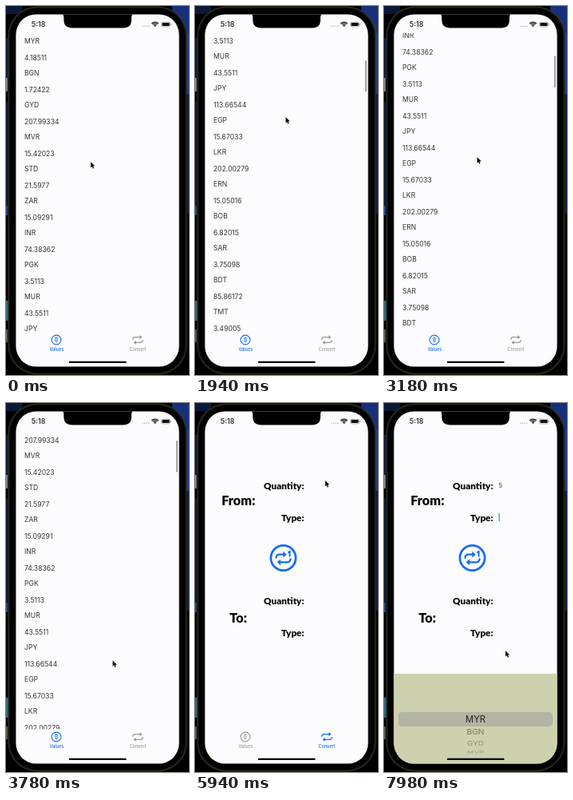
Write an HTML page with a canvas that moves like this. It is 229 px wide and 462 px high and loops after 8 s.

```html
<!DOCTYPE html>
<html lang="en">
<head>
<meta charset="utf-8">
<title>Currency values and converter</title>
<style>
html, body { margin: 0; width: 100%; height: 100%; overflow: hidden; background: #000; }
canvas { display: block; width: 229px; height: 462px; }
</style>
</head>
<body>
<canvas id="stage"></canvas>
<script>
const W = 229, H = 462, LOOP = 8000;
const canvas = document.getElementById('stage');
const dpr = window.devicePixelRatio || 1;
canvas.width = W * dpr;
canvas.height = H * dpr;
const ctx = canvas.getContext('2d');

const BLUE = '#126cf0', GREY = '#98989a', INK = '#343438', PAPER = '#fcfcfe';
const UI = 'Inter, "Open Sans", sans-serif';
const MARKER = 'Lato, "Open Sans", sans-serif';

const TAB_SWITCH = 4700, FOCUS_QUANTITY = 6120, TYPE_DIGIT = 6560, FOCUS_TYPE = 7000;

const rates = `MYR 4.18511 BGN 1.72422 GYD 207.99334 MVR 15.42023 STD 21.5977 ZAR 15.09291
INR 74.38362 PGK 3.5113 MUR 43.5511 JPY 113.66544 EGP 15.67033 LKR 202.00279 ERN 15.05016
BOB 6.82015 SAR 3.75098 BDT 85.86172 TMT 3.49005 KZT 431.4027`.split(/\s+/);

const scrollKeys = [[0, 0], [960, 0], [1080, 12], [1350, 74], [1500, 165], [1700, 245], [1940, 301],
  [2300, 322], [2700, 322], [3180, 247], [3320, 206], [3500, 150], [3750, 102], [4100, 70], [4460, 60], [4600, 59]];
const cursorX = [[0, 106], [700, 110], [1080, 116.5], [1940, 113.5], [2700, 115], [3180, 116.5], [3500, 118],
  [4300, 169], [4750, 169], [5800, 163], [6200, 163], [6850, 150], [7150, 150], [7980, 152]];
const cursorY = [[0, 195], [500, 195], [960, 179], [1080, 167], [1350, 105], [1940, 139], [2450, 114],
  [2700, 114], [3180, 189], [3320, 230], [3600, 280], [4300, 421], [4750, 421], [5800, 97], [6200, 97],
  [6850, 139], [7150, 139], [7980, 310]];

// Monotone cubic through [time, value] keys
function track(keys, t) {
  const n = keys.length;
  if (t <= keys[0][0]) return keys[0][1];
  if (t >= keys[n - 1][0]) return keys[n - 1][1];
  let i = 0;
  while (keys[i + 1][0] < t) i++;
  const slope = k => (keys[k + 1][1] - keys[k][1]) / (keys[k + 1][0] - keys[k][0]);
  const tangent = k => {
    if (k === 0 || k === n - 1) return 0;
    const a = slope(k - 1), b = slope(k);
    return a * b > 0 ? 2 * a * b / (a + b) : 0;
  };
  const [t0, v0] = keys[i], [t1, v1] = keys[i + 1];
  const d = t1 - t0, u = (t - t0) / d, w = 1 - u;
  return v0 * (1 + 2 * u) * w * w + tangent(i) * d * u * w * w
    + v1 * u * u * (3 - 2 * u) - tangent(i + 1) * d * u * u * w;
}

const clamp = v => Math.max(0, Math.min(1, v));

function box(x, y, w, h, r, fill) {
  ctx.beginPath();
  ctx.roundRect(x, y, w, h, r);
  ctx.fillStyle = fill;
  ctx.fill();
}

function text(str, x, y, size, color, { weight = 400, align = 'left', font = UI } = {}) {
  ctx.font = `${weight} ${size}px ${font}`;
  ctx.textAlign = align;
  ctx.textBaseline = 'alphabetic';
  ctx.fillStyle = color;
  ctx.fillText(str, x, y + size * 0.36);
}

// Two opposed arrows; topTip shortens the upper one
function repeatIcon(x, y, scale, color, width, topTip = 5.2) {
  ctx.save();
  ctx.translate(x, y);
  ctx.scale(scale, scale);
  ctx.strokeStyle = ctx.fillStyle = color;
  ctx.lineWidth = width;
  ctx.lineCap = 'round';
  for (const tip of [topTip, 5.2]) {
    ctx.beginPath();
    ctx.moveTo(-6, -0.5);
    ctx.quadraticCurveTo(-6, -3.2, -3.2, -3.2);
    ctx.lineTo(tip - 2.6, -3.2);
    ctx.stroke();
    ctx.beginPath();
    ctx.moveTo(tip - 2.9, -5.8);
    ctx.lineTo(tip, -3.2);
    ctx.lineTo(tip - 2.9, -0.6);
    ctx.fill();
    ctx.rotate(Math.PI);
  }
  ctx.restore();
}

function ring(x, y, r, color, width) {
  ctx.beginPath();
  ctx.arc(x, y, r, 0, 7);
  ctx.strokeStyle = color;
  ctx.lineWidth = width;
  ctx.stroke();
}

function drawDesktop() {
  ctx.fillStyle = '#000';
  ctx.fillRect(0, 0, W, H);
  const strip = (x, y, w, h, c) => { ctx.fillStyle = c; ctx.fillRect(x, y, w, h); };
  strip(0, 0, 20, 10, '#0c1838');
  strip(0, 40, 3, 50, '#0c1a40');
  strip(0, 90, 2, 17, '#7c8294');
  strip(0, 120, 2, 130, '#0d1a40');
  strip(0, 250, 2, 12, '#20488c');
  strip(0, 369, 3, 25, '#2c6c80');
  strip(0, 405, 2, 16, '#54585c');
  strip(208, 0, 21, 34, '#18307c');
  strip(226, 34, 3, 76, '#1c3a98');
  strip(227, 110, 2, 150, '#0e1c58');
  box(2.5, 0.5, 224, 461, 37, '#38381f');
  box(3.5, 1.5, 222, 459, 36, '#12120a');
  box(5, 3, 219, 456, 35, '#000');
}

function drawStatus() {
  text('5:18', 31.8, 23, 8.9, INK, { weight: 600 });
  for (let i = 0; i < 4; i++) box(170.5 + i * 2.5, 24.6, 1.3, 1.3, 0.6, '#a4a4a8');
  ctx.strokeStyle = '#111';
  ctx.lineWidth = 1.2;
  for (const r of [2.6, 4.6, 6.2]) {
    ctx.beginPath();
    ctx.arc(186.5, 26.2, r, -Math.PI * 0.75, -Math.PI * 0.25);
    ctx.stroke();
  }
  box(185.8, 24.7, 1.5, 1.5, 0.7, '#111');
  ctx.beginPath();
  ctx.roundRect(194.5, 20.2, 11, 5.8, 1.8);
  ctx.lineWidth = 0.6;
  ctx.strokeStyle = '#88888c';
  ctx.stroke();
  box(195.4, 21.1, 9.2, 4, 1, '#111');
  box(206.2, 22.2, 0.8, 1.9, 0.4, '#88888c');
}

function drawTabs(converting) {
  const left = converting ? GREY : BLUE, right = converting ? BLUE : GREY;
  ring(63, 418, 5.9, left, 1.1);
  text('B', 63.1, 418, 6.6, left, { weight: 500, align: 'center' });
  ctx.fillStyle = left;
  for (const x of [61.9, 63.4]) {
    ctx.fillRect(x, 414.6, 0.7, 1.2);
    ctx.fillRect(x, 420.2, 0.7, 1.2);
  }
  repeatIcon(165, 418, 1.05, right, 1.2);
  text('Values', 63.3, 430, 5.5, left, { weight: 500, align: 'center' });
  text('Convert', 165, 430, 5.5, right, { weight: 500, align: 'center' });
}

function drawValues(t) {
  const scroll = track(scrollKeys, t);
  ctx.save();
  ctx.beginPath();
  ctx.rect(12, 34, 205, 374.5);
  ctx.clip();
  rates.forEach((str, i) => {
    const y = 44 + (i >> 1) * 40 + (i % 2) * 21 - scroll;
    if (y > 20 && y < 420) text(str, 23, y, 8.6, INK);
  });
  ctx.restore();
  ctx.globalAlpha = clamp((t - 960) / 80);
  box(213, 37 + scroll * 0.103, 1.8, 39.5, 0.9, '#9a9a9c');
  ctx.globalAlpha = 1;
}

function drawConvert(t) {
  const label = (str, x, y, size) =>
    text(str, x, y, size, '#080808', { weight: 900, align: 'right', font: MARKER });
  const caret = (x, y) => box(x, y - 5, 1.2, 10, 0.5, '#3c78e8');
  label('Quantity:', 136.5, 103.5, 11.7);
  label('From:', 75.5, 122.5, 16.3);
  label('Type:', 136.5, 143.5, 11.7);
  label('Quantity:', 136.5, 247.5, 11.7);
  label('To:', 65, 269.5, 16.3);
  label('Type:', 136.5, 287.5, 11.7);

  ring(110.5, 194, 15.6, BLUE, 2.7);
  repeatIcon(110.5, 194.5, 1.5, BLUE, 1.5, 2.8);
  ctx.beginPath();
  ctx.moveTo(116.4, 187.4);
  ctx.lineTo(118.6, 186);
  ctx.lineTo(118.6, 192.6);
  ctx.strokeStyle = BLUE;
  ctx.lineWidth = 1.9;
  ctx.stroke();

  const typed = t >= TYPE_DIGIT;
  if (typed) text('5', 143.5, 103, 7.6, '#333');
  if (t >= FOCUS_TYPE) caret(143.6, 143);
  else if (t >= FOCUS_QUANTITY) caret(typed ? 149 : 143.6, 103);
}

function drawPicker(t) {
  const p = clamp((t - FOCUS_TYPE - 40) / 380);
  if (p === 0) return;
  ctx.save();
  ctx.translate(0, 114 * Math.pow(1 - p, 3));
  ctx.fillStyle = '#cfd1ae';
  ctx.fillRect(12, 339, 205, 120);
  box(18, 387, 193, 18, 4.5, '#b3b4a3');
  const option = (str, y, size, squash, color) => {
    ctx.save();
    ctx.translate(114.5, y);
    ctx.scale(1, squash);
    text(str, 0, 0, size, color, { align: 'center' });
    ctx.restore();
  };
  option('MYR', 396, 11.2, 1, '#222');
  option('BGN', 412, 10.2, 0.9, '#75766c');
  option('GYD', 426.5, 9.8, 0.72, '#86877a');
  option('MVR', 437, 9.4, 0.48, '#9c9d8c');
  ctx.restore();
}

function drawCursor(t) {
  ctx.save();
  ctx.translate(track(cursorX, t), track(cursorY, t));
  ctx.scale(0.9, 0.9);
  ctx.beginPath();
  [[0, 0], [0, 8.4], [1.9, 6.7], [3.1, 9.6], [4.5, 9], [3.3, 6.2], [5.9, 6]].forEach(p => ctx.lineTo(...p));
  ctx.closePath();
  ctx.lineJoin = 'round';
  ctx.lineWidth = 1.2;
  ctx.strokeStyle = '#fff';
  ctx.stroke();
  ctx.fillStyle = '#0a0a0c';
  ctx.fill();
  ctx.restore();
}

function drawNotch() {
  ctx.beginPath();
  ctx.moveTo(69, 9);
  ctx.quadraticCurveTo(72.3, 10.5, 72.3, 14);
  ctx.lineTo(72.3, 17);
  ctx.quadraticCurveTo(72.3, 27.5, 83, 27.5);
  ctx.lineTo(146.5, 27.5);
  ctx.quadraticCurveTo(157, 27.5, 157, 17);
  ctx.lineTo(157, 14);
  ctx.quadraticCurveTo(157, 10.5, 160.5, 9);
  ctx.fillStyle = '#000';
  ctx.fill();
}

function draw(t) {
  ctx.setTransform(dpr, 0, 0, dpr, 0, 0);
  drawDesktop();
  ctx.save();
  ctx.beginPath();
  ctx.roundRect(12.4, 10.4, 204.2, 441.2, 25.5);
  ctx.clip();
  ctx.fillStyle = PAPER;
  ctx.fillRect(0, 0, W, H);
  const converting = t >= TAB_SWITCH;
  if (converting) drawConvert(t);
  else drawValues(t);
  drawStatus();
  drawTabs(converting);
  drawPicker(t);
  box(78.8, 444.7, 71.8, 2.4, 1.2, '#0a0a0a');
  drawNotch();
  ctx.restore();
  drawCursor(t);
}

const start = performance.now();
function tick() {
  draw((performance.now() - start) % LOOP);
  requestAnimationFrame(tick);
}
tick();
</script>
</body>
</html>
```
